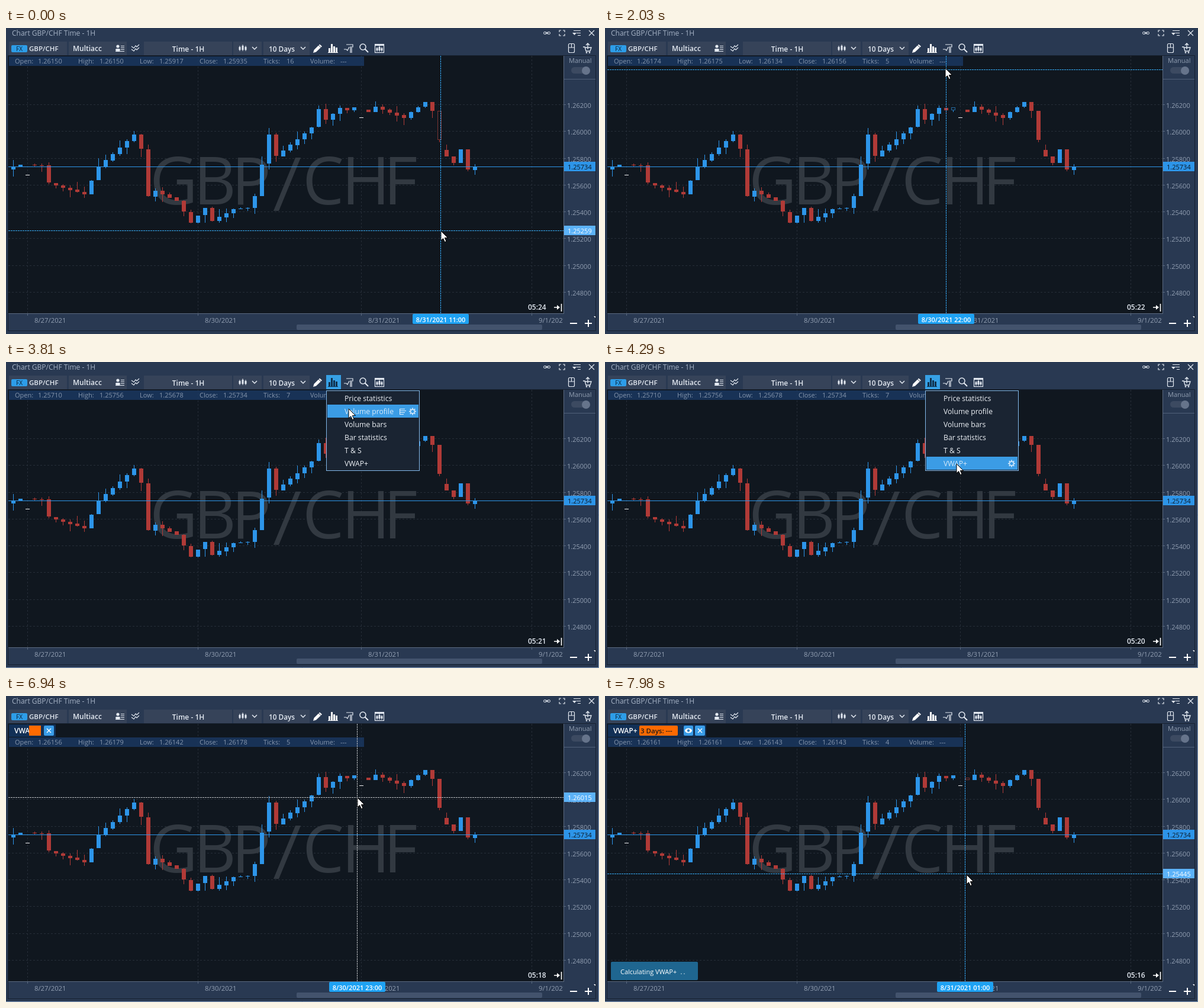
Animation of 1002x517 px, one loop 8000 ms. Source, as an HTML page with a canvas:

```html
<!DOCTYPE html>
<html lang="en">
<head>
<meta charset="utf-8">
<title>Price chart</title>
<style>
html, body { margin: 0; width: 100%; height: 100%; overflow: hidden; background: #293952; }
canvas { display: block; }
</style>
</head>
<body>
<canvas id="stage" width="1002" height="517"></canvas>
<script>
const ctx = document.getElementById('stage').getContext('2d');
const LOOP = 8000;
const PANEL = '#293952', BUTTON = '#364359', CHART = '#10171f';
const UP = '#2d95e9', DOWN = '#b03a37', INK = '#e4eaf2', MUTED = '#929fb2';

// Straight-line course through key points; the first number of each point is the position.
function along(points, u) {
  let k = 1;
  while (k < points.length - 1 && points[k][0] < u) k++;
  const a = points[k - 1], b = points[k];
  const f = Math.max(0, Math.min(1, (u - a[0]) / (b[0] - a[0])));
  return a.slice(1).map((v, i) => v + (b[i + 1] - v) * f);
}
const noise = n => { const v = Math.sin(n * 12.9898) * 43758.5453; return v - Math.floor(v); };

// Turning points of the price: hour, height on the stage
const course = [
  [0, 239], [2, 231], [5, 232], [6, 262], [11, 281], [13, 234], [18, 180], [19, 204], [20, 285], [21, 275],
  [24, 292], [26, 329], [28, 304], [29, 326], [32, 306], [34, 304], [35, 284], [36, 230], [37, 180], [38, 217],
  [43, 168], [44, 137], [45, 155], [47, 135], [48, 139], [49, 134], [51, 142], [52, 133], [56, 152], [57, 142],
  [59, 125], [60, 140], [61, 189.5], [61, 206], [63, 228], [64, 205], [65, 240], [66, 234.5]
];
const HOURS = 66, thinOpens = [2, 49];

// Each bar opens where the last one closed; a thin opening hour is a bare dash below the course.
const bars = Array.from({ length: HOURS }, (_, i) => {
  let [o] = along(course, i + 0.01), [c] = along(course, i + 0.99);
  if (thinOpens.includes(i)) {
    o = c = o + 17;
    return { o, c, h: o, l: o };
  }
  const wick = n => 14 * noise(n) ** 2;
  return { o, c, h: Math.min(o, c) - wick(i + 1), l: Math.max(o, c) + wick(i + 101) };
});

const price = y => (1.25259 + (342 - y) * 4.42e-5).toFixed(5);
const priceY = p => 342 - (p - 1.25259) / 4.42e-5;
const barX = i => 12 + 12 * i;
const barAt = x => Math.max(0, Math.min(HOURS - 1, Math.round((x - 12) / 12)));

// Pointer path: time, x, y
const path = [
  [1530, 735, 343], [1640, 681, 209], [1660, 671, 193], [2010, 577, 71], [2300, 554, 33],
  [3730, 554, 33], [3810, 579, 79], [4290, 594, 172], [7530, 594, 172], [7960, 609, 301], [8000, 613, 303]
];
function pointer(t) {
  const [x, y] = along(path, t).map(Math.round);
  return { x, y: t >= 1060 && t < 1530 ? y + 1 : y };
}

const clockSteps = [1090, 1900, 2790, 3900, 5000, 5740, 6970, 7800];
const clock = t => '05:' + (24 - clockSteps.filter(s => t >= s).length);

function rect(x, y, w, h, fill) { ctx.fillStyle = fill; ctx.fillRect(x, y, w, h); }
function round(x, y, w, h, r, fill) {
  ctx.fillStyle = fill; ctx.beginPath(); ctx.roundRect(x, y, w, h, r); ctx.fill();
}
function text(s, x, y, fill, size = 11, weight = 400, align = 'left') {
  ctx.font = `${weight} ${size}px "Open Sans", "Noto Sans", sans-serif`;
  ctx.textAlign = align; ctx.fillStyle = fill; ctx.fillText(s, x, y);
}
// Open strokes, each a flat list of x, y pairs
function lines(color, width, ...strokes) {
  ctx.strokeStyle = color; ctx.lineWidth = width; ctx.beginPath();
  for (const p of strokes)
    for (let i = 0; i < p.length; i += 2) ctx[i ? 'lineTo' : 'moveTo'](p[i], p[i + 1]);
  ctx.stroke();
}
function shape(fill, ...p) {
  ctx.fillStyle = fill; ctx.beginPath();
  for (let i = 0; i < p.length; i += 2) ctx.lineTo(p[i], p[i + 1]);
  ctx.closePath(); ctx.fill();
}
function circle(x, y, r, fill, stroke, width = 1) {
  ctx.beginPath(); ctx.arc(x, y, r, 0, 7);
  if (fill) { ctx.fillStyle = fill; ctx.fill(); }
  if (stroke) { ctx.strokeStyle = stroke; ctx.lineWidth = width; ctx.stroke(); }
}
function dashed(color, dash, ...strokes) {
  ctx.setLineDash(dash); lines(color, 1, ...strokes); ctx.setLineDash([]);
}
function cross(x, y, r, color, width = 1.2) {
  lines(color, width, [x - r, y - r, x + r, y + r], [x - r, y + r, x + r, y - r]);
}
function gear(x, y, color) {
  for (let a = 0; a < 6; a += Math.PI / 4) {
    const c = Math.cos(a), s = Math.sin(a);
    lines(color, 1.8, [x + 3 * c, y + 3 * s, x + 6 * c, y + 6 * s]);
  }
  circle(x, y, 3.4, null, color, 1.6);
}
// Small candles for icons, centred on x
function candles(x, y, step, h) {
  for (let i = 0; i < 3; i++) {
    const lift = i === 1 ? 2 : 0;
    rect(x + (i - 1) * step - 1.5, y - lift, 3, h + lift, INK);
    rect(x + (i - 1) * step - 0.5, y - lift - 2, 1, h + lift + 4, INK);
  }
}

function drawGrid() {
  rect(4, 47, 938, 435, CHART);
  for (let p = 1.262; p > 1.247; p -= 0.002) {
    const y = Math.round(priceY(p)) + 0.5;
    dashed('#262e38', [3, 3], [4, y, 942, y]);
  }
  for (const x of [36, 324, 600, 888]) dashed('#262e38', [3, 3], [x + 0.5, 47, x + 0.5, 482]);
  const mark = { G: 243, B: 317, P: 381, C: 501, H: 567, F: 638 };
  for (const c in mark) text(c, mark[c], 298, '#323941', 111);
  shape('#323941', 452, 309, 489, 219, 498, 219, 461, 309);
}

function drawBars(hollow) {
  bars.forEach((b, i) => {
    const x = barX(i), top = Math.round(Math.min(b.o, b.c)), h = Math.max(1, Math.round(Math.abs(b.o - b.c)));
    const color = b.o === b.c ? '#f2f2f2' : b.c < b.o ? UP : DOWN;
    rect(x, Math.round(b.h), 1, Math.max(1, Math.round(b.l - b.h)), color);
    rect(x - 3, top, 7, h, color);
    if (i === hollow && h > 2) {
      rect(x - 3, top, 7, h, color === UP ? '#24699f' : '#78322f');
      rect(x - 2, top + 1, 5, h - 2, CHART);
    }
  });
  rect(4, 234, 938, 1, UP);
}

function drawInfo(i, y) {
  const b = bars[i];
  rect(5, y, 600, 16, 'rgba(26,56,96,.85)');
  const cells = [[15, 'Open:', 54, price(b.o)], [122, 'High:', 158, price(b.h)], [226, 'Low:', 259, price(b.l)],
    [327, 'Close:', 367, price(b.c)], [435, 'Ticks:', 474, 3 + Math.round((b.l - b.h) / 4)], [514, 'Volume:', 565, '---']];
  for (const [x, name, vx, value] of cells) {
    text(name, x, y + 12, '#8696ad');
    text(value, vx, y + 12, '#8696ad');
  }
}

function drawBadge(full) {
  rect(5, 48, full ? 166 : 79, 21, '#123056');
  const close = x => { round(x, 50, 17, 17, 2, '#3a9de8'); cross(x + 8.5, 58.5, 3.5, '#fff', 1.4); };
  text('VWAP+', 14, 63, '#fff', 12, 600);
  if (!full) { rect(39, 50, 45, 17, '#123056'); rect(39, 50, 20, 17, '#ff6a00'); close(64); return; }
  round(58, 50, 65, 17, 2, '#ff6a00');
  text('3 Days: ---', 60, 63, '#1b1b1b', 11.5, 600);
  round(133, 50, 16, 17, 2, '#3a9de8');
  ctx.fillStyle = '#fff'; ctx.beginPath(); ctx.ellipse(141, 58.5, 6, 4, 0, 0, 7); ctx.fill();
  circle(141, 58.5, 2.2, '#2d7fc0');
  close(152);
}

function drawCrosshair(p, white) {
  dashed(white ? '#b9bcc0' : '#35aaf8', [3, 1], [4, p.y + 0.5, 942, p.y + 0.5], [p.x + 0.5, 47, p.x + 0.5, 482]);
}

function drawAxes(t) {
  rect(942, 47, 54, 465, PANEL);
  rect(4, 482, 992, 30, PANEL);
  rect(942, 47, 1, 436, '#5b6a80');
  rect(4, 482, 939, 1, '#5b6a80');
  for (let p = 1.262; p > 1.247; p -= 0.002) {
    const y = Math.round(priceY(p));
    rect(942, y, 4, 1, '#5b6a80');
    text(p.toFixed(5), 948, y + 6, MUTED);
  }
  rect(943, 86, 53, 1, '#52627b');
  text('Manual', 951, 59, MUTED);
  round(955, 66, 32, 11, 5.5, '#3c4a61');
  circle(980, 72, 7, '#66748b');
  ctx.save();
  ctx.beginPath(); ctx.rect(4, 482, 938, 30); ctx.clip();
  [[36, '8/27/2021'], [324, '8/30/2021'], [600, '8/31/2021'], [888, '9/1/2021']].forEach(([x, day]) => {
    rect(x, 482, 1, 4, '#5b6a80');
    text(day, x + 12, 498, MUTED, 11.3);
  });
  ctx.restore();
  round(491, 501, 415, 9, 2, '#43536d');
  lines('#fff', 2, [953, 499, 965, 499], [978, 499, 990, 499], [984, 493, 984, 505]);
  shape('#fff', 993, 487, 996, 487, 996, 490);
  text(clock(t), 882, 476, INK, 12, 600);
  lines('#fff', 1.6, [926, 472, 934, 472], [938.5, 466, 938.5, 479]);
  shape('#fff', 931, 468, 936, 472, 931, 476);
}

function drawLabels(p) {
  rect(943, 226, 53, 16, UP);
  text('1.25734', 949, 239, '#0b1622');
  if (!p) return;
  if (p.y > 94) {
    rect(943, p.y - 8, 53, 16, '#5cb2f8');
    text(price(p.y), 949, p.y + 5, '#fff');
  }
  const hours = barAt(p.x) - 49, hour = (hours + 48) % 24;
  const label = `8/${hours < 0 ? 30 : 31}/2021 ${String(hour).padStart(2, '0')}:00`;
  round(p.x - 47, 483, 95, 17, 2, '#1ea2f3');
  text(label, p.x + 0.5, 497, '#fff', 11, 600, 'center');
}

function drawTitle() {
  text('Chart GBP/CHF Time - 1H', 10, 13, '#a5b2c5', 12);
  ctx.strokeStyle = INK; ctx.lineWidth = 1;
  for (const x of [908.5, 914.5]) { ctx.beginPath(); ctx.roundRect(x, 6.5, 5, 4, 2); ctx.stroke(); }
  lines(INK, 1, [911, 8.5, 917, 8.5]);
  for (const sx of [-1, 1])
    for (const sy of [-1, 1])
      lines(INK, 1.2, [939.5 + 4.5 * sx, 8.5 + 1.5 * sy, 939.5 + 4.5 * sx, 8.5 + 4.5 * sy, 939.5 + 1.5 * sx, 8.5 + 4.5 * sy]);
  lines(INK, 1, [959, 4.5, 971, 4.5], [964, 8.5, 971, 8.5], [966, 12.5, 971, 12.5]);
  shape(INK, 957, 8, 964, 8, 960.5, 12);
  cross(989.5, 8.5, 4.5, INK);
}

function chevron(x) { lines(INK, 1.5, [x - 4, 32, x, 36, x + 4, 32]); }

function drawToolbar(state) {
  for (const [x, w] of [[5, 98], [106, 98], [233, 149], [384, 48], [435, 78]]) rect(x, 23, w, 23, BUTTON);
  round(9, 29, 27, 12, 2, '#2d9de8');
  text('FX', 22.5, 39, '#0c2238', 10, 400, 'center');
  text('GBP/CHF', 39, 39, INK, 11.5, 600);
  text('Multiacc', 113, 39, INK, 12, 600);
  circle(189, 31, 2.6, INK);
  round(185, 35, 8, 4, 2, INK);
  for (const y of [30.5, 33.5, 36.5]) lines(INK, 1, [194, y, 200, y]);
  lines(INK, 1, [185, 39.5, 200, 39.5]);
  for (const y of [31, 36]) lines(INK, 1.2, [212, y, 216, y + 3, 219, y - 1, 221, y + 1, 225, y - 3]);
  text('Time - 1H', 308, 40, INK, 12, 600, 'center');
  candles(400, 32, 5, 5);
  chevron(420);
  text('10 Days', 444, 40, INK, 11.8, 600);
  chevron(502);

  shape('#fff', 519, 42, 520.5, 37, 530, 27.5, 534, 31, 524, 40.5);
  lines(PANEL, 1, [528, 29, 532.5, 33]);
  if (state) rect(541, 22, 25, 25, state === 'open' ? '#36a0e5' : '#435571');
  const ink = state === 'open' ? '#10314d' : '#fff';
  [34, 27, 31, 33].forEach((y, i) => rect(545 + 4 * i, y, 3, 41 - y, ink));
  rect(544, 41, 17, 1, ink);

  lines(INK, 1.2, [571, 36, 575, 36, 577, 38, 580, 32], [575, 28, 586, 28, 586, 32, 582, 32, 582, 42], [584, 33, 584, 42]);
  circle(603, 32, 5, null, INK, 1.5);
  lines(INK, 2, [606.5, 35.5, 612, 41]);
  ctx.strokeStyle = INK; ctx.lineWidth = 1.2; ctx.strokeRect(623.5, 27.5, 15, 14);
  rect(623, 27, 16, 3, INK);
  candles(631, 34, 4, 4);

  ctx.beginPath(); ctx.roundRect(950.5, 26.5, 10, 15, 2); ctx.stroke();
  lines(INK, 1.2, [950, 33, 961, 33], [955.5, 27, 955.5, 33]);
  lines(INK, 1.3, [975, 32, 978, 32, 980, 39, 987, 39, 989, 33, 979, 33], [983, 26, 983, 36], [980, 29, 983, 26, 986, 29]);
  for (const x of [981, 986]) circle(x, 41.5, 1.3, INK);
}

function drawMenu(y) {
  rect(541, 48, 158, 136, '#83b9ea');
  rect(542, 49, 156, 134, '#1a2432');
  const items = ['Price statistics', 'Volume profile', 'Volume bars', 'Bar statistics', 'T & S', 'VWAP+'];
  const active = Math.floor((y - 50) / 22);
  items.forEach((name, i) => {
    const mid = 62 + 22 * i, on = i === active;
    if (on) {
      rect(543, mid - 12, 154, 22, '#3b9ce5');
      gear(687, mid - 0.5, '#cfe6f9');
      if (name === 'Volume profile') {
        rect(665, mid - 5, 1, 10, '#e5f1fb');
        for (let k = 0; k < 4; k++) rect(665, mid - 5 + 3 * k, 11 - 2 * Math.abs(k - 1), 1, '#e5f1fb');
      }
    }
    text(name, 572, mid + 4, on ? '#d5e9f9' : '#edf1f6', 12.2);
  });
}

function drawHint(alpha) {
  ctx.globalAlpha = alpha;
  rect(596, 195, 212, 55, 'rgba(0,0,0,.25)');
  rect(593, 192, 212, 55, '#8ea3bf');
  ['VWAP+ allows calculating a cumulative', 'volume-weighted average price for', 'defined period']
    .forEach((s, i) => text(s, 603, 210 + 13 * i, '#0c1118', 10.5));
  ctx.globalAlpha = 1;
}

function drawToast(t) {
  round(10, 449, 147, 31, 2, '#1f6690');
  text('Calculating VWAP+', 26, 470, '#fff');
  text('.', 127.5, 470, '#fff');
  if (t >= 7280) text('.', 132.5, 470, '#fff');
}

function drawPointer({ x, y }) {
  const outline = [0, 0, 0, 16, 3.6, 12.6, 6.4, 18.6, 9, 17.5, 6.3, 11.6, 11.4, 11.4];
  const at = outline.map((v, i) => v + (i % 2 ? y : x));
  shape('#fff', ...at);
  lines('#000', 1, [...at, x, y]);
}

function draw(t) {
  const tip = pointer(t), late = pointer(t - 20);
  const hair = { x: late.x - 1, y: late.y - 1 };
  const hairOn = (t < 2300 && hair.y >= 47) || t >= 6840;
  const badge = t >= 6900, done = t >= 6970;
  const menu = t >= 3330 && t < 6800;
  const settled = hairOn && (t < 2300 || done);

  rect(0, 0, 1002, 517, PANEL);
  drawTitle();
  drawToolbar(menu ? 'open' : t >= 2200 && t < 3330 ? 'hover' : '');
  drawGrid();
  drawBars(settled ? barAt(pointer(t - 50).x - 1) : -1);
  drawInfo(hairOn ? barAt(hair.x) : HOURS - 1, badge ? 70 : 48);
  if (badge) drawBadge(done);
  if (hairOn) drawCrosshair(hair, !settled);
  drawAxes(t);
  drawLabels(hairOn ? hair : null);
  lines('#172130', 1, [3.5, 512, 3.5, 46.5, 996.5, 46.5, 996.5, 511.5, 3.5, 511.5]);
  if (t >= 3250) lines('#7f9bbd', 1, [1001.5, 0, 1001.5, 516.5, 0, 516.5]);
  if (done) drawToast(t);
  if (t >= 2540 && t < 3250) {
    rect(491, 0, 126, 23, '#8ea3bf');
    text('Volume analysis tools', 554, 15, '#0c1118', 10.5, 400, 'center');
  }
  if (menu) drawMenu(tip.y);
  if (menu && t >= 4660) drawHint(t < 4690 ? 0.5 : 1);
  drawPointer(tip);
}

// The picture advances in steps of 10 ms.
function frame() {
  draw(Math.floor(performance.now() % LOOP / 10) * 10);
  requestAnimationFrame(frame);
}
frame();
</script>
</body>
</html>
```
